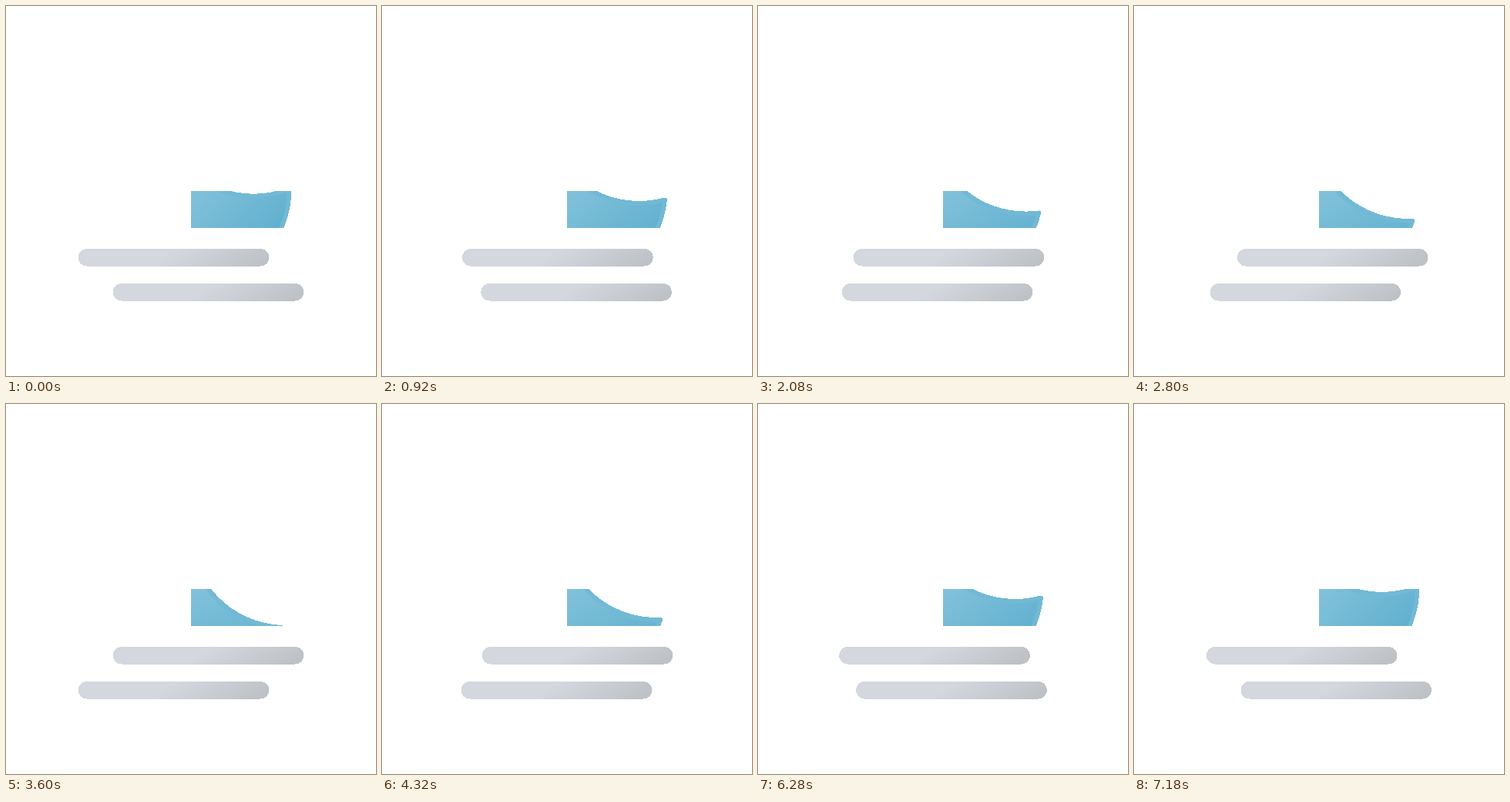
These frames come from a looping animation (480x480 px, 7220 ms). An HTML page:

```html
<!DOCTYPE html>
<html lang="en">
<head>
<meta charset="utf-8">
<title>Night haze</title>
<style>
  html, body { margin: 0; width: 100%; height: 100%; overflow: hidden; background: #fff; }
  svg { display: block; width: 480px; height: 480px; shape-rendering: crispEdges; }
</style>
</head>
<body>
<svg viewBox="0 0 512 512">
  <defs>
    <linearGradient id="night" gradientUnits="userSpaceOnUse" x1="21.92" y1="18.75" x2="38.52" y2="47.52">
      <stop offset=".45" stop-color="#86c3db"/>
      <stop offset="1" stop-color="#5eafcf"/>
    </linearGradient>
    <linearGradient id="mist" gradientUnits="userSpaceOnUse" x1="98.4" y1="-46" x2="165.6" y2="70">
      <stop offset=".45" stop-color="#d4d7dd"/>
      <stop offset="1" stop-color="#bec1c6"/>
    </linearGradient>
    <clipPath id="window"><rect x="256" y="256" width="256" height="51.2"/></clipPath>
  </defs>
  <g clip-path="url(#window)">
    <g transform="scale(8)">
      <path id="moon" fill="url(#night)" stroke="#72b9d5" stroke-width=".75" stroke-linejoin="round"
        d="M46.66 36.2a16.66 16.66 0 0 1-16.78-16.55 16.29 16.29 0 0 1 .55-4.15A16.56 16.56 0 1 0 48.5 36.1c-.61.06-1.22.1-1.84.1z"/>
    </g>
  </g>
  <rect id="upper" width="264" height="24" rx="12" fill="url(#mist)"/>
  <rect id="lower" width="264" height="24" rx="12" fill="url(#mist)"/>
</svg>
<script>
  const LOOP = 7220, STEP = 20, LAST = 359, HALF = 180;
  const [moon, upper, lower] = ['moon', 'upper', 'lower'].map(id => document.getElementById(id));

  // Gentle start, soft landing: Bézier with evenly spaced x handles
  const ease = u => 3 * (1 - u) ** 2 * u * .16 + 3 * (1 - u) * u * u + u ** 3;
  const place = (el, x, y) => el.setAttribute('transform', `translate(${x} ${y})`);

  function draw(now) {
    const frame = Math.min(LAST, Math.floor(now % LOOP / STEP));
    const swing = 1 - Math.abs(frame / HALF - 1);
    const drift = frame < HALF ? ease(swing) : swing;
    moon.setAttribute('transform', `rotate(${-15 + 24 * swing} 32 32)`);
    place(upper, 100 + 48 * drift, 336);
    place(lower, 148 - 48 * drift, 384);
    requestAnimationFrame(tick);
  }

  const start = performance.now();
  const tick = () => draw(performance.now() - start);
  tick();
</script>
</body>
</html>
```
